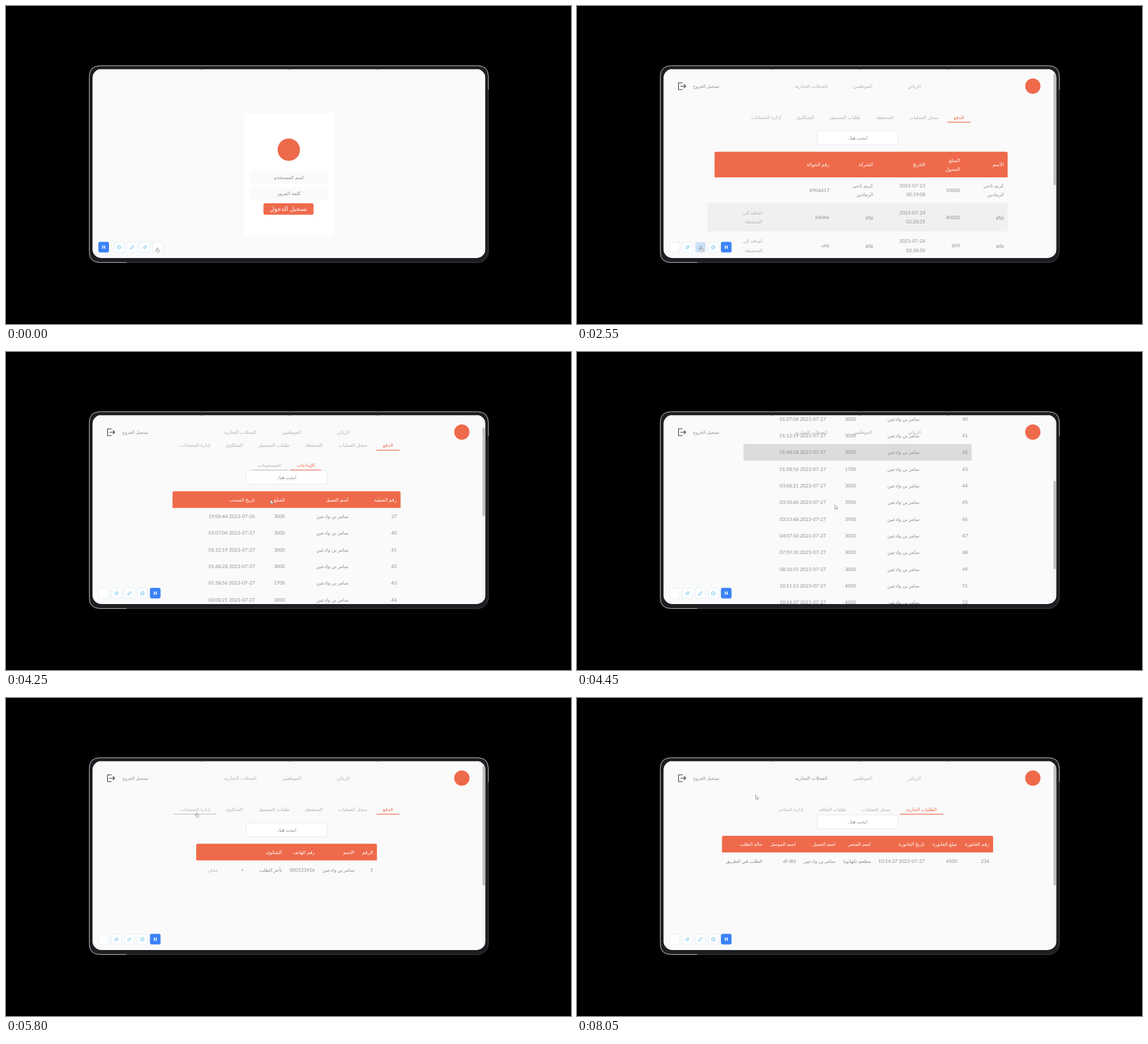
An HTML page that plays this animation: 960 px wide and 540 px high, repeating every 8150 ms.

```html
<!DOCTYPE html>
<html lang="ar">
<head>
<meta charset="utf-8">
<title>Dashboard tour</title>
<style>
html, body { margin: 0; width: 100%; height: 100%; overflow: hidden; background: #000; }
svg { display: block; width: 960px; height: 540px; }
text { font-family: Lato, 'DejaVu Sans', sans-serif; }
</style>
</head>
<body>
<svg id="stage" viewBox="0 0 960 540" xmlns="http://www.w3.org/2000/svg"></svg>
<script>
const LOOP = 8150, STEP = 50, SIZE = 8.2;
const ORANGE = '#ee6a4b', PAPER = '#fafafa', INK = '#8d8d92', PALE = '#b3b3ba';
const TOP = 107, VIEW = 321, MIDDLE = 476.7;
const stage = document.getElementById('stage');

// Shape and text helpers
const rect = (x, y, r, b, fill, rx = 0, extra = '') =>
  `<rect x="${x}" y="${y}" width="${r - x}" height="${b - y}" rx="${rx}" fill="${fill}" ${extra}/>`;
const path = (d, stroke, width = 1, fill = 'none') =>
  `<path d="${d}" stroke="${stroke}" stroke-width="${width}" fill="${fill}" stroke-linejoin="round" stroke-linecap="round"/>`;
const text = (x, y, str, fill = INK, anchor = 'end', size = SIZE) =>
  str.split('|').map((part, i, all) =>
    `<text x="${x}" y="${y + 3 + (i - (all.length - 1) / 2) * 15.4}" font-size="${size}" fill="${fill}" text-anchor="${anchor}">${part}</text>`).join('');
const label = (x, y, str, fill = PALE, size = SIZE) => text(x, y, str, fill, 'middle', size);
const dot = (x, y, r) => `<circle cx="${x}" cy="${y}" r="${r}" fill="${ORANGE}"/>`;
const hot = (kind, box, shape) => `<g data-kind="${kind}" data-box="${box}" opacity="0">${shape}</g>`;
const sum = list => list.reduce((a, b) => a + b, 0);

const pen = document.createElement('canvas').getContext('2d');
pen.font = `${SIZE}px Lato, 'DejaVu Sans', sans-serif`;
const widthOf = str => Math.max(...str.split('|').map(s => pen.measureText(s).width));

// Toolbar
const icons = {
  camera: path('M-3-1 0-3.2 3-1 2.4 2.4 0 3.2-2.4 2.4ZM-1 0H1', '#58bdec', .9),
  pencil: path('M-3 3-2.4 .9 1.6-3 3-1.6-.9 2.4Z', '#58bdec', .9),
  eraser: path('M-3.3 .8 .8-2.8 3.3-.8-.8 2.8ZM-1.2-1 1.2 1', '#58bdec', .9),
  blank: ''
};
function tool(name, x) {
  if (name === 'pause') {
    return rect(x - 9, 400.5, x + 9, 418.5, '#3b82f6', 3) + path(`M${x - 1.6} 407.3v4.2m3.2 0v-4.2`, '#fff', 1.7);
  }
  const face = fill => rect(x - 8.5, 401, x + 8.5, 418, fill, 2.5, 'stroke="#dcecf8" stroke-width=".8"');
  return face('#fff') + hot('tool', [x - 9, 400, x + 9, 419], face('#cfe1f3')) +
    `<g transform="translate(${x} 409.5)">${icons[name]}</g>`;
}
const tools = 'blank eraser pencil camera pause'.split(' ');

// A centred, right-to-left row of tabs; the first one is active
function tabs(names, y) {
  const PAD = 22, GAP = 4.5;
  const widths = names.map(n => widthOf(n) + PAD);
  let r = MIDDLE + (sum(widths) + GAP * (names.length - 1)) / 2;
  return names.map((name, i) => {
    const x = r - widths[i], mid = r - widths[i] / 2;
    const rule = fill => rect(x, y + 8.2, r, y + 9.4, fill);
    const out = label(mid, y, name, i ? PALE : ORANGE) +
      (i ? hot('tab', [x, y - 9, r, y + 10], rule('#c3c3cd')) : rule(ORANGE));
    r = x - GAP;
    return out;
  }).join('');
}

const search = y =>
  rect(409, y, 544.5, y + 22, '#fff', 3, 'filter="url(#soft)"') +
  label(MIDDLE, y + 11, '\u200fابحث هنا..\u200f', INK);

// Columns take the width of their widest cell; cells past the headings are buttons
function table({ heads, rows, min = 0, inset = 0, hover = '#dcdcdc' }, y) {
  const count = Math.max(...rows.map(r => r.length));
  const pad = i => i < heads.length || !rows.some(r => r[i]) ? 6.5 : 19.5;
  const natural = Array.from({ length: count }, (_, i) =>
    Math.max(...[heads, ...rows].map(r => widthOf(r[i] || ''))) + 2 * pad(i));
  const stretch = Math.max(1, min / sum(natural));
  const total = sum(natural) * stretch, x = MIDDLE - total / 2, r = MIDDLE + total / 2;
  const edge = i => r - sum(natural.slice(0, i)) * stretch - pad(i);
  const height = cells => (cells.some(c => c.includes('|')) ? 43.5 : 28.35) + (cells.length > heads.length ? 4.8 : 0);

  let b = y + height(heads);
  const head = path(`M${x + inset} ${b}V${y + 3}q0-3 3-3H${r - 3}q3 0 3 3V${b}Z`, 'none', 0, ORANGE) +
    heads.map((h, i) => text(edge(i), (y + b) / 2, h, '#fff')).join('');
  const body = rows.map(cells => {
    const top = b;
    b += height(cells);
    return hot('row', [x, top, r, b], rect(x, top, r, b, hover)) +
      cells.map((c, i) => text(edge(i), (top + b) / 2, c, i < heads.length ? INK : PALE)).join('');
  }).join('');
  return { svg: head + body, bottom: b };
}

function page(start, tabRows, searchY, data) {
  const grid = table(data, searchY + 34.7);
  const content = Math.max(507, grid.bottom - TOP + 77);
  return {
    start, thumb: VIEW * VIEW / content,
    svg: tabRows.map((names, i) => tabs(names, 188.5 + 33.7 * i)).join('') + search(searchY) + grid.svg
  };
}

// Contents
const MAIN = ['الدفع', 'سجل العمليات', 'المحفظة', 'طلبات التسجيل', 'الشكاوى', 'إدارة الحسابات'];
const CLIENT = 'سامر بن وادعين', PAYER = 'كريم ناجي|الرمادين', PHONE = '000123456', DAY = '2023-07-27';
const ADD = 'أضافة الى|المحفظة', PEOPLE = ['الرقم', 'الاسم', 'رقم الهاتف'];
const gdg = ['gdg', '899', '2023-07-24|02:38:50', 'gdg', 'vhh', '', ADD];

const login = rect(404, 182, 557, 389, '#fff') + dot(480.5, 244, 19) +
  rect(414, 281, 548, 302, PAPER, 4) + rect(414, 308, 548, 329, PAPER, 4) +
  `<g id="user">${label(480.5, 291, 'اسم المستخدم', INK)}</g><g id="pass">${label(480.5, 318, 'كلمة المرور', INK)}</g>` +
  `<g id="userCaret">${rect(480, 287, 480.8, 296, '#555')}</g><g id="passCaret">${rect(480, 313, 480.8, 323, '#555')}</g>` +
  rect(437.5, 335, 522.5, 354.5, ORANGE, 3) + label(480, 344.5, 'تسجيل الدخول', '#fff', 10.4) +
  [...tools].reverse().map((n, i) => tool(n, i ? 170.3 + 22 * i : 166)).join('');

const pages = [
  { start: 0, svg: login, thumb: 0 },
  page(2450, [MAIN], 212.8, {
    min: 510, inset: 12, hover: '#f0f0f0',
    heads: ['الأسم', 'المبلغ|المحول', 'التاريخ', 'الشركة', 'رقم الحوالة'],
    rows: [
      [PAYER, '50000', '2023-07-23|00:19:08', PAYER, 'K904417'],
      ['gfgj', '40000', '2023-07-24|02:28:25', 'gfgj', 'frlkfhh', '', ADD],
      gdg, gdg, gdg, gdg
    ]
  }),
  page(3300, [MAIN, ['الطلبات الجارية', 'الطلبات المنتهية', 'الطلبات الملغية']], 232.8, {
    heads: ['رقم الطلب', 'الأسم', 'الوقت', 'الموقع', 'الحالة'],
    rows: ['11:13:50', '10:16:02', '10:14:37'].map((at, i) =>
      [`${236 - i}`, CLIENT, `${at} ${DAY}`, 'نوار - ضبي', i < 2 ? 'تم تأكيد الطلب' : 'الطلب في الطريق', '•', 'الغاء الطلب'])
  }),
  page(4150, [MAIN, ['الإيداعات', 'المسحوبات']], 232.4, {
    min: 387.5,
    heads: ['رقم العملية', 'أسم العميل', 'المبلغ', 'تاريخ السحب'],
    rows: `37 3000 19:06:44,40 3000 01:07:04,41 3000 01:12:19,42 3000 01:48:28,43 1700 01:58:56,
      44 3000 03:08:21,45 3900 03:50:46,46 3900 03:53:48,47 3000 04:07:36,48 3000 07:59:30,
      49 3000 08:10:55,51 4500 10:11:53,52 4500 10:14:37,53 4500 10:16:02,54 3000 11:13:50`
      .split(',').map((s, i) => {
        const [id, amount, at] = s.trim().split(' ');
        return [id, CLIENT, amount, `${at} ${i ? DAY : '2023-07-26'}`];
      })
  }),
  page(5000, [MAIN], 212.8, {
    heads: [...PEOPLE, 'العنوان'], rows: [['1', CLIENT, PHONE, 'نوار - ضبي', '•', 'حذف', 'قبول']]
  }),
  page(5400, [MAIN], 212.8, {
    heads: [...PEOPLE, 'الشكوى'], rows: [['1', CLIENT, PHONE, 'تأخر الطلب', '•', 'حذف']]
  }),
  page(5850, [MAIN], 212.8, {
    heads: [...PEOPLE, 'العنوان'],
    rows: [
      ['1', CLIENT, PHONE, 'نوار - ضبي'], ['2', 'كريم ناجي الرمادين', PHONE, 'نوار - الدوحين'],
      ['7', 'عادل زنبور', '66', 'وادين - جور'], ['74', 'karim alramadin', PHONE, 'nawar - addawhin']
    ].map(r => [...r, '•', 'حذف', 'عرض العمليات'])
  }),
  page(6600, [['الطلبات الجارية', 'سجل العمليات', 'طلبات التعاقد', 'إدارة المتاجر']], 199.3, {
    heads: ['رقم الفاتورة', 'مبلغ الفاتورة', 'تاريخ الفاتورة', 'اسم المتجر', 'اسم العميل', 'اسم الموصل', 'حالة الطلب'],
    rows: [['234', '4500', `10:14:37 ${DAY}`, 'مطعم نكهاتونا', CLIENT, 'df dfd', 'الطلب في الطريق']]
  })
];
const SHOPS = pages.length - 1;

const chrome = path('M179 130.5H172.5V142H179M176 136.2H184.5M182 133.5 184.7 136.2 182 139', '#333', 1.1) +
  label(219.5, 135.5, 'تسجيل الخروج', INK, 7.4) +
  label(573, 135.5, 'الزبائن') + label(485.5, 135.5, 'الموظفين') +
  `<g id="shopNav">${label(398, 135.5, 'المحلات التجارية')}</g>` + dot(774.5, 136, 13) +
  rect(809.5, TOP, 814.5, 428, '#f3f3f3') + '<rect id="thumb" x="809.7" width="4.6" fill="#c1c1c3"/>' +
  tools.map((n, i) => tool(n, 166 + 21.9 * i)).join('');

stage.innerHTML = `<defs>
  <clipPath id="screen">${rect(147, TOP, 814.5, 428, '#fff', 15)}</clipPath>
  <filter id="soft" x="-10%" y="-40%" width="120%" height="180%"><feDropShadow dx="0" dy="0" stdDeviation="1.8" flood-color="#ccd0e4" flood-opacity=".75"/></filter></defs>` +
  rect(141.5, 101.5, 819.5, 435.5, '#1d1e22', 18, 'stroke="#48484c" stroke-width=".9"') +
  path('M204 435.5H159.5Q141.5 435.5 141.5 417.5V119.5Q141.5 101.5 159.5 101.5H801.5Q819.5 101.5 819.5 119.5V142', '#d5ced2', .9) +
  `<g clip-path="url(#screen)">` + rect(147, TOP, 814.5, 428, PAPER) + rect(160, TOP, 802, TOP + 1, '#a7a7a9') +
  pages.map(p => `<g class="page">${p.svg}</g>`).join('') + `<g id="chrome">${chrome}</g></g>` +
  [0, 1, 2].map(i => rect(330.5 + 149.5 * i, 106, 333.5 + 149.5 * i, 108, '#4a4a4d', 1)).join('') +
  `<g id="arrow">${path('M0 0V6.6L1.7 5.2 2.8 7.6 4 7 2.9 4.8H4.8Z', '#77777d', .7, '#fff')}</g>` +
  `<g id="hand">${path('M0 0Q-.8 .2-.6 1V4L-2 3.3-2.3 4.3-.3 7H2.7L3.4 3.2 .6 2.5V.7Q.6 0 0 0Z', '#77777d', .7, '#fff')}</g>`;

const $ = id => document.getElementById(id);
const groups = [...stage.querySelectorAll('.page')];
const zones = [...stage.querySelectorAll('[data-box]')].map(el => ({
  el, kind: el.dataset.kind, box: el.dataset.box.split(',').map(Number), page: groups.indexOf(el.closest('.page'))
}));

// Pointer stops: arrival time, x, y, longest travel time
const stops = [
  [0, 257, 411], [250, 172, 409], [850, 478, 290], [1300, 170, 406, 200], [2450, 300, 365, 1], [2550, 211, 410],
  [3200, 588, 191], [3500, 520, 330], [3700, 575, 192], [3800, 529, 191], [4350, 438, 260], [4950, 434, 187],
  [5350, 385, 188], [5750, 322, 189], [6150, 369, 339], [6550, 398, 136], [6900, 470, 275], [7150, 450, 390],
  [7500, 655, 290], [7800, 200, 300], [8050, 303.5, 165]
];
function pointer(t) {
  const i = stops.findIndex(s => s[0] > t);
  if (i < 1) return stops.at(i).slice(1, 3);
  const [t0, x0, y0] = stops[i - 1], [t1, x1, y1, longest = 450] = stops[i];
  const span = Math.min(longest, t1 - t0);
  const u = Math.max(0, 1 - (t1 - t) / span), f = u * u * (3 - 2 * u);
  return [x0 + (x1 - x0) * f, y0 + (y1 - y0) * f];
}

// Scroll down and back up again within 700 ms
const bump = (t, from, peak, cap) => {
  const u = (t - from) / 700;
  return u > 0 && u < 1 ? Math.min(cap, peak * Math.sin(Math.PI * u) ** 2) : 0;
};
const scrollAt = t => bump(t, 4170, 248, 248) + bump(t, 5900, 100, 69.7);

const show = (el, on) => { el.style.display = on ? '' : 'none'; };
const within = ([x, y], [x1, y1, x2, y2]) => x >= x1 && x < x2 && y >= y1 && y < y2;

function draw(t) {
  const current = pages.filter(p => p.start <= t).length - 1;
  const scroll = scrollAt(t), pos = pointer(t), old = pointer(t - 100);
  const docPos = [pos[0], pos[1] + scroll], docOld = [old[0], old[1] + scrollAt(t - 100)];
  const { thumb } = pages[current];
  let link = current === 0 && pos[1] > 400;

  groups.forEach((g, i) => show(g, i === current));
  groups[current].setAttribute('transform', `translate(0 ${-scroll})`);
  show($('chrome'), current > 0);
  $('shopNav').firstChild.setAttribute('fill', current === SHOPS ? INK : PALE);
  $('thumb').setAttribute('height', thumb);
  $('thumb').setAttribute('y', 115 + scroll * thumb / VIEW);

  // Row hover trails the pointer; tab underlines linger
  for (const { el, kind, box, page } of zones) {
    const alive = current > 0 && (page < 0 || page === current);
    const now = alive && within(page < 0 ? pos : docPos, box);
    const before = alive && within(docOld, box);
    const on = { row: before, tab: now || before, tool: now }[kind];
    el.setAttribute('opacity', on ? 1 : 0);
    if (now && kind !== 'row') link = true;
  }

  show($('user'), t < 850);
  show($('pass'), t < 1700);
  show($('userCaret'), (t >= 850 && t < 950) || (t >= 1100 && t < 1550));
  show($('passCaret'), t >= 1900);

  for (const [id, on] of [['arrow', !link], ['hand', link]]) {
    show($(id), on);
    $(id).setAttribute('transform', `translate(${pos[0]} ${pos[1]})`);
  }
}

const start = performance.now();
function tick() {
  const t = (performance.now() - start) % LOOP;
  draw(Math.floor(t / STEP) * STEP);
  requestAnimationFrame(tick);
}
tick();
</script>
</body>
</html>
```
